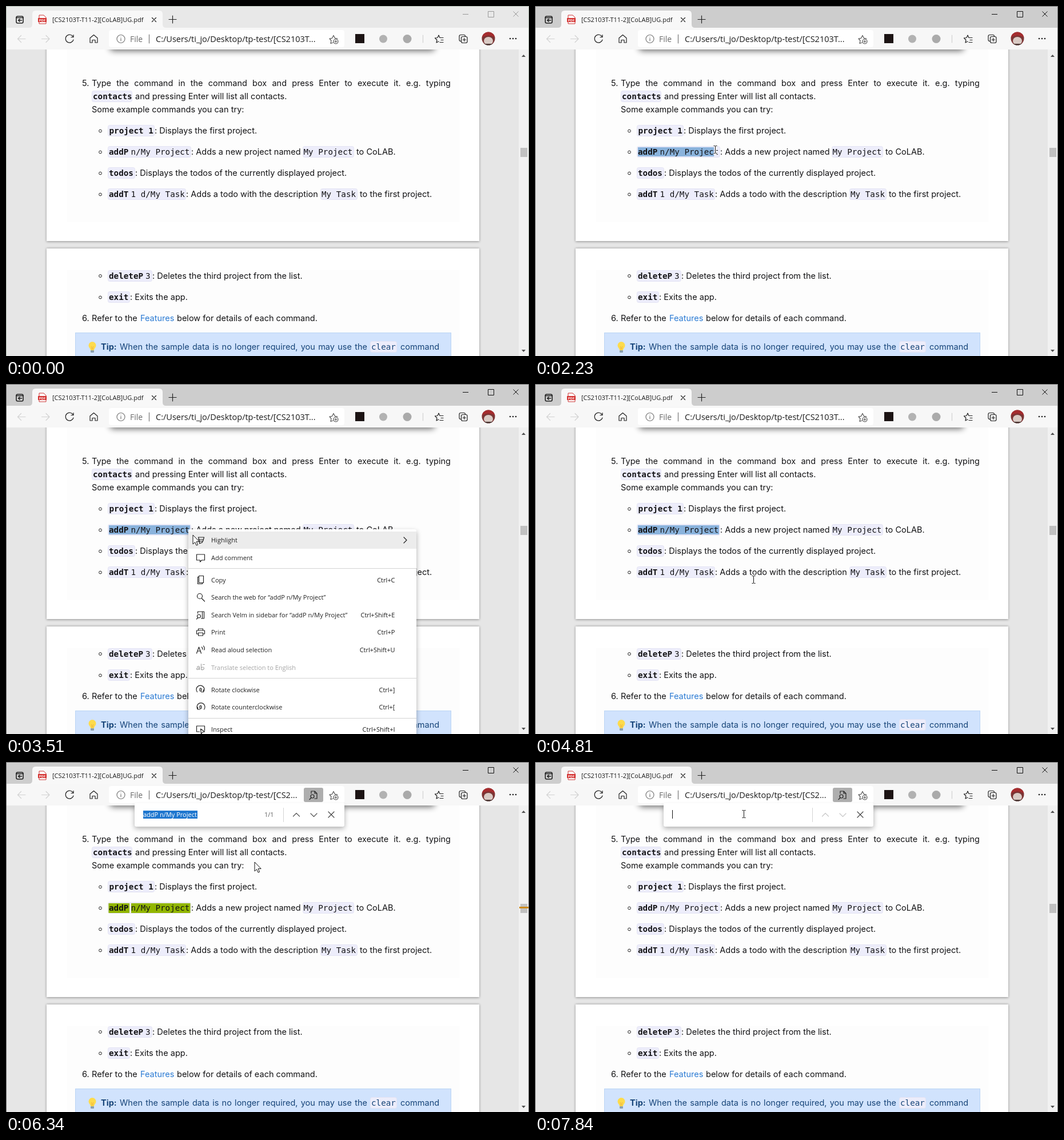
These frames come from a looping animation (915 px wide and 612 px high, 8 s). An HTML page:

```html
<!DOCTYPE html>
<html lang="en">
<head>
<meta charset="utf-8">
<title>Browser demo</title>
<style>
html, body { margin: 0; width: 100%; height: 100%; overflow: hidden; background: #e6e6e6; }
svg { display: block; }
text { white-space: pre; }
.body, .just { font: 14.54px Inter, sans-serif; fill: #131315; color: #131315; }
.just { text-align: justify; text-align-last: justify; line-height: 20px; }
.code { font: 14.25px "DejaVu Sans Mono", monospace; fill: #131315; }
.bold { font-weight: 700; }
.ui { font: 11px "Open Sans", sans-serif; fill: #1c1c1c; }
.url { font: 14.5px "Open Sans", sans-serif; fill: #1c1c1c; }
.chip { fill: #ededfb; stroke: #e4e4f4; }
.icon { fill: none; stroke: #222; stroke-width: 1.2; stroke-linecap: round; stroke-linejoin: round; }
.faint { stroke: #d2d2d2; }
</style>
</head>
<body>
<svg id="stage" width="915" height="612" viewBox="0 0 915 612">
  <defs>
    <filter id="soft" filterUnits="userSpaceOnUse" x="0" y="0" width="915" height="700"><feGaussianBlur stdDeviation="6"/></filter>
    <filter id="edge" filterUnits="userSpaceOnUse" x="0" y="0" width="915" height="700"><feGaussianBlur stdDeviation="2"/></filter>
    <filter id="lift" filterUnits="userSpaceOnUse" x="0" y="0" width="915" height="700"><feGaussianBlur stdDeviation="5"/></filter>
    <clipPath id="face"><circle cx="844" cy="57" r="11.5"/></clipPath>
  </defs>

  <rect width="915" height="612" fill="#e6e6e6"/>
  <g filter="url(#edge)" fill="#000" opacity=".38">
    <rect x="71" y="40" width="757" height="372"/>
    <rect x="71" y="424" width="757" height="220"/>
  </g>
  <g fill="#fff">
    <rect x="71" y="40" width="757" height="371"/>
    <rect x="71" y="424" width="757" height="220"/>
  </g>
  <g fill="#fdfdfd">
    <rect x="107" y="76" width="686" height="302"/>
    <rect x="107" y="462" width="686" height="150"/>
  </g>
  <rect x="182" y="50" width="568" height="28" rx="5" fill="#000" opacity=".62" filter="url(#soft)"/>
  <rect x="121.500" y="571.500" width="657" height="60" fill="#d1e3fd" stroke="#b9d4f5"/>
  <g id="chips"></g>
  <rect id="select" x="180" y="247" height="16" fill="#8ab3dc"/>
  <g id="found" fill="#92b600">
    <rect x="179.500" y="247" width="36.500" height="17"/>
    <rect x="219" y="247" width="103.500" height="17"/>
  </g>
  <g id="words"></g>
  <g transform="translate(151 597)">
    <path d="M-3 5C-3 2-6.500 0-6.500-3.500A6.500 6.500 0 0 1 6.500-3.500C6.500 0 3 2 3 5Z" fill="#fddb4c"/>
    <path d="M-2 -2L-1 0V4M2 -2L1 0V4" fill="none" stroke="#f0b23c"/>
    <rect x="-3" y="5" width="6" height="4" rx="1" fill="#8ca0ae"/>
  </g>

  <rect x="897" y="76" width="18" height="536" fill="#f1f1f1"/>
  <rect x="900" y="248" width="12" height="16" fill="#c1c1c1"/>
  <path d="M902 89L905.500 85L909 89ZM902 601L905.500 605L909 601Z" fill="#505050"/>
  <rect id="mark" x="898" y="253" width="17" height="3" fill="#cd8a18"/>

  <rect id="bar" width="915" height="38"/>
  <path d="M40 38Q46 38 46 32V14Q46 8 52 8H268Q274 8 274 14V32Q274 38 280 38Z" fill="#f8f8f8"/>
  <rect y="38" width="915" height="38" fill="#f7f7f7"/>
  <g class="icon">
    <rect x="18" y="18" width="12" height="12" rx="2.500" stroke-width="1.600"/>
    <path d="M18 20.500H30M27.500 25H21.500M24 22.700L21.500 25L24 27.300" stroke-width="1.500"/>
    <path d="M255.500 20.500L262.500 27.500M262.500 20.500L255.500 27.500M285 23.500H298M291.500 17V30"/>
  </g>
  <path d="M58 16H66L70 20V31H58Z" fill="#fff" stroke="#c33"/>
  <rect x="56" y="21" width="15" height="7" fill="#d3302f"/>
  <text x="63.500" y="27" text-anchor="middle" font-family="Open Sans, sans-serif" font-size="6" font-weight="700" fill="#fff">PDF</text>
  <text class="ui" x="81" y="28">[CS2103T-T11-2][CoLAB]UG.pdf</text>
  <path id="buttons" d="M799 14.500H809M843.500 9.500H853.500V19.500H843.500ZM887.500 9.500L896.500 18.500M896.500 9.500L887.500 18.500" fill="none"/>
  <path class="icon faint" d="M34 57.500H20.500M26.500 51.500L20.500 57.500L26.500 63.500M62.500 57.500H76M70 51.500L76 57.500L70 63.500"/>
  <path class="icon" d="M117.500 54A7 7 0 1 0 118 59M118 50.500V54.500H114M147 56L153.500 50.500L160 56V64H156V59.500H151V64H147Z"/>
  <rect x="180" y="42" width="412" height="30" rx="4" fill="#fff"/>
  <g class="icon" style="stroke:#777"><circle cx="201" cy="57.500" r="7"/><path d="M201 56.500V61M201 54V54.200M250.500 50V65"/></g>
  <text class="url" x="217" y="63" style="font-size:14px;fill:#6b6b6b">File</text>
  <text class="url" id="url" x="262" y="63"></text>
  <g id="button"><rect x="521" y="45" width="34" height="25" rx="3" fill="#aeaeae"/>
    <path class="icon" d="M534 55V51H540L544 55V64H540M540 51V55H544"/><circle class="icon" cx="536" cy="60" r="3"/><path class="icon" d="M534 62.500L531 65.500"/></g>
  <g class="icon" style="stroke:#555">
    <path d="M572 64L568 65.500L569 60.500L566 57L570.500 56.300L573 51.500L575.500 56.300L580 57"/>
    <circle cx="577" cy="62" r="4"/><path d="M575 62H579M577 60V64"/>
  </g>
  <rect x="611" y="49" width="16" height="16" fill="#1c1414"/>
  <circle cx="660" cy="57.500" r="7" fill="#b2b2b2"/>
  <circle cx="702" cy="57.500" r="7.500" fill="#aaa"/>
  <path class="icon faint" d="M729.500 51V64"/>
  <path class="icon" d="M753 64L754 59.500L750.500 56L755 55.500L757 51L759 55.500H765M761 59.500H765M759 63.500H765M753 64L757 62"/>
  <path class="icon" d="M795.500 61.500Q793 61.500 793 59V53Q793 50.500 795.500 50.500H801Q803.500 50.500 803.500 53"/>
  <rect class="icon" x="796.500" y="53.500" width="10.500" height="11" rx="2.500"/><path class="icon" d="M799 59H804.500M801.700 56.300V61.700"/>
  <g clip-path="url(#face)">
    <rect x="832" y="45" width="24" height="24" fill="#7b3434"/>
    <ellipse cx="844" cy="61" rx="8" ry="7" fill="#d9cac4"/>
    <path d="M832 55V45H856V55Q844 48 832 55Z" fill="#a52c2e"/>
    <rect x="832" y="66" width="24" height="4" fill="#4a3633"/>
  </g>
  <g fill="#222"><circle cx="882" cy="57" r="1.300"/><circle cx="887" cy="57" r="1.300"/><circle cx="892" cy="57" r="1.300"/></g>

  <g id="find">
    <rect x="225" y="78" width="367" height="38" fill="#000" opacity=".32" filter="url(#lift)"/>
    <path d="M225 72H592V110Q592 113 589 113H228Q225 113 225 110Z" fill="#fff"/>
    <rect id="picked" x="240" y="85" width="95" height="14" fill="#1f77cf"/>
    <text class="ui" id="query" x="240" y="96">addP n/My Project</text>
    <path id="caret" d="M0 84V99" stroke="#111"/>
    <text class="ui" id="count" x="452" y="96" style="fill:#666">1/1</text>
    <path d="M485.500 80V105" stroke="#d4d4d4"/>
    <path class="icon" id="arrows" d="M502.500 95L508 89.500L513.500 95M533 90L538.500 95.500L544 90"/>
    <path class="icon" d="M564 87L574 97M574 87L564 97" style="stroke:#444"/>
  </g>

  <g id="menu">
    <rect x="319" y="258" width="399" height="380" fill="#000" opacity=".32" filter="url(#lift)"/>
    <rect x="319" y="254" width="399" height="370" rx="3" fill="#fff"/>
    <rect id="hover" x="319" width="399" height="30" fill="#ececec"/>
    <path d="M319 322.500H718M319 514.500H718M319 584.500H718" stroke="#d3d3d3"/>
    <g id="items"></g>
  </g>

  <rect id="frame" x=".5" y=".5" width="914" height="630" fill="none"/>
  <path id="arrow" d="M0 0V16L3.700 12.600L6.100 18.200L8.600 17.200L6.200 11.600H11.200Z" fill="#fff" stroke="#111"/>
  <g id="beam" fill="none">
    <path d="M-3 -7H3M0 -7V7M-3 7H3" stroke="#fff" stroke-width="3"/>
    <path d="M-3 -6.500H-1L0 -6L1 -6.500H3M0 -6V6M-3 6.500H-1L0 6L1 6.500H3" stroke="#111"/>
  </g>
</svg>
<script>
const $ = id => document.getElementById(id);
const show = (id, on) => $(id).setAttribute('display', on ? 'inline' : 'none');
const set = (id, name, value) => $(id).setAttribute(name, value);
const text = (cls, x, y, str, fill) =>
  `<text class="${cls}" x="${x}" y="${y}"${fill ? ` style="fill:${fill}"` : ''}>${str}</text>`;
const justify = (x, y, width, str, color = '') =>
  `<foreignObject x="${x}" y="${y - 15.25}" width="${width}" height="21"><div class="just" style="color:${color}">${str}</div></foreignObject>`;

// Page text: plain runs, code runs and their chips
const navy = '#164478';
const plain = [
  [133, 140, '5.'], [226, 163, 'and pressing Enter will list all contacts.'],
  [150, 186, 'Some example commands you can try:'],
  [260, 223, ': Displays the first project.'],
  [324, 260, ': Adds a new project named'], [613, 260, 'to CoLAB.'],
  [226, 297, ': Displays the todos of the currently displayed project.'],
  [315, 334, ': Adds a todo with the description'], [619, 334, 'to the first project.'],
  [256, 476.5, ': Deletes the third project from the list.'],
  [217, 514, ': Exits the app.'],
  [133, 551, '6.'], [150, 551, 'Refer to the'], [235, 551, 'Features', '#2b7bd4'],
  [299, 551, 'below for details of each command.'], [690, 601, 'command', navy]
];
const bold = [
  [152, 163, 'contacts'], [180.5, 223, 'project 1'], [180, 260, 'addP'], [180, 297, 'todos'],
  [180, 334, 'addT'], [180, 476.5, 'deleteP'], [180, 514, 'exit']
];
const code = [
  [218.5, 260, 'n/My Project'], [520.5, 260, 'My Project'], [218.5, 334, '1 d/My Task'],
  [552, 334, 'My Task'], [244, 476.5, '3'], [639, 601, 'clear', navy]
];
const chips = [
  [150, 163, 221], [178, 223, 260], [178, 260, 324], [519, 260, 609], [178, 297, 226],
  [178, 334, 315], [550, 334, 615], [178, 476.5, 256], [178, 514, 217], [637, 601, 684]
];
const bullets = [218, 255, 292, 329, 471.5, 509];

$('chips').innerHTML = chips.map(([x, y, end]) =>
  `<rect class="chip" x="${x + .5}" y="${Math.round(y) - 14.5}" width="${end - x - 1}" height="19" rx="3"/>`).join('');
$('words').innerHTML =
  plain.map(([x, y, s, c]) => text('body', x, y, s, c)).join('') +
  bold.map(([x, y, s]) => text('code bold', x, y, s)).join('') +
  code.map(([x, y, s, c]) => text('code', x, y, s, c)).join('') +
  bullets.map(y => `<circle cx="165" cy="${y + .5}" r="2.4" fill="none" stroke="#222"/>`).join('') +
  justify(150, 140, 628, 'Type the command in the command box and press Enter to execute it. e.g. typing') +
  text('body bold', 166, 601, 'Tip:', navy) +
  justify(199, 601, 433, 'When the sample data is no longer required, you may use the', navy);

// Menu rows: centre y, label, shortcut, icon path around (0, 0)
const printer = 'M-4 -3V-6H4V-3M-4 3H-7V-3H7V3H4M-4 1H4V6H-4Z';
const turn = 'M-6 4A7 7 0 1 1 5 4M5 0V4H1M-1 0A1.500 1.500 0 1 0 1 0A1.500 1.500 0 1 0 -1 0';
const bubble = 'M-7 -6H7V4H2L-1 7V4H-7Z';
const rows = [
  [273, 'Highlight', '', 'M-4 -5H6L4 2H-2ZM-2 2V6L3 4V2M-4 -1H5'],
  [304, 'Add comment', '', bubble],
  [342.5, 'Copy', 'Ctrl+C', 'M-3 -7H5V5H-3ZM-3 -5H-5V7H3V5'],
  [373, 'Search the web for “addP n/My Project”', '', 'M2 2L7 7M-6 -2A4.500 4.500 0 1 1 3 -2A4.500 4.500 0 1 1 -6 -2'],
  [404, 'Search Velm in sidebar for “addP n/My Project”', 'Ctrl+Shift+E', 'M-5 -3V-6H6V6H1M3 -6V6M-6 2A3 3 0 1 1 0 2A3 3 0 1 1 -6 2M-5 5L-7 7'],
  [434, 'Print', 'Ctrl+P', printer],
  [465, 'Read aloud selection', 'Ctrl+Shift+U', 'M-7 6L-3 -5L1 6M-5.500 2H0M2 -5Q4 -3 3 -1M5 -7Q8 -3 6 0'],
  [495.5, 'Translate selection to English', '', 'M-6 -1Q-2 -3 -2 0V4M-2 1Q-7 0 -7 3Q-5 5 -2 2M1 -6V4Q6 5 6 1Q4 -2 1 1M4 -5H7'],
  [534.5, 'Rotate clockwise', 'Ctrl+]', turn],
  [565, 'Rotate counterclockwise', 'Ctrl+[', turn, -1],
  [604, 'Inspect', 'Ctrl+Shift+I', 'M-2 4H-7V-6H7V2M0 -1L7 4L3 5L1 8Z']
];
$('items').innerHTML = rows.map(([y, label, keys, path, flip = 1]) => {
  const color = label.startsWith('Translate') ? '#a5a5a5' : '#222';
  return `<path class="icon" style="stroke:${color}" transform="translate(340.5 ${y}) scale(${flip} 1)" d="${path}"/>` +
    text('ui', 359, y + 4, label, color) +
    `<text class="ui" x="680.5" y="${y + 4}" text-anchor="end">${keys}</text>`;
}).join('') + '<path class="icon" d="M696 268L701 273L696 278"/>';

// Pointer moves: start, end, steps, target x, y
const moves = [
  [680, 1450, 11, 179, 251], [1630, 2230, 9, 315, 251], [2230, 2370, 2, 327, 255],
  [2670, 3100, 6, 319, 254], [3380, 3510, 2, 327, 264], [3510, 4060, 11, 382, 342],
  [4810, 5290, 8, 440, 219], [6180, 6340, 3, 435, 175], [6340, 6640, 5, 365, 79],
  [6780, 6790, 1, 365, 91]
];
function pointer(t) {
  let x = 720, y = 604;
  for (const [from, to, steps, tx, ty] of moves) {
    if (t < from) break;
    const p = Math.min(1, Math.floor((t - from) / (to - from) * steps + 1e-6) / steps);
    const e = p * p * (3 - 2 * p);
    x += (tx - x) * e;
    y += (ty - y) * e;
  }
  return [x, y];
}

// Selection snaps to whole characters
function selectionEnd(x) {
  if (x < 217) return 180 + 8.55 * Math.max(0, Math.round((x - 180) / 8.55));
  return Math.min(322, 218.5 + 8.6 * Math.round((x - 218.5) / 8.6));
}

function draw(t) {
  const within = (from, to) => t >= from && t < to;
  const [x, y] = pointer(t);
  const active = t >= 1630;
  set('bar', 'fill', active ? '#cdcdcd' : '#e8e8e8');
  set('buttons', 'stroke', active ? '#111' : '#999');
  set('frame', 'stroke', active ? '#6c6c6c' : '#a9b3a9');

  const finding = t >= 5980, matched = within(6050, 7840);
  show('select', within(1630, 6050));
  set('select', 'width', (t < 2370 ? selectionEnd(x) : 322) - 180);
  show('found', matched);
  show('mark', matched);

  const picked = within(5980, 6950) || within(7410, 7790);
  show('find', finding);
  show('button', finding);
  $('url').textContent = 'C:/Users/ti_jo/Desktop/tp-test/[CS2' + (finding ? '...' : '103T...');
  show('picked', picked);
  show('query', t < 7790);
  $('query').style.fill = picked ? '#fff' : '#222';
  show('caret', within(6950, 7410) || t >= 7790);
  set('caret', 'transform', `translate(${t < 7790 ? 335.5 : 240.5} 0)`);
  show('count', matched);
  $('arrows').style.stroke = matched ? '#555' : '#c8c8c8';

  show('menu', within(3380, 4330));
  const row = rows.find(r => Math.abs(r[0] - y) <= 15.5);
  show('hover', within(3400, 4330) && row);
  if (row) set('hover', 'y', row[0] - 15);

  const beam = within(1380, 3380) || within(4490, 5150) || t >= 6580;
  show('beam', beam);
  show('arrow', t >= 680 && !beam);
  const at = `translate(${Math.round(x) + (beam ? .5 : 0)} ${Math.round(y)})`;
  set('beam', 'transform', at);
  set('arrow', 'transform', at);
}

function tick() {
  draw(performance.now() % 8000);
  requestAnimationFrame(tick);
}
tick();
</script>
</body>
</html>
```
